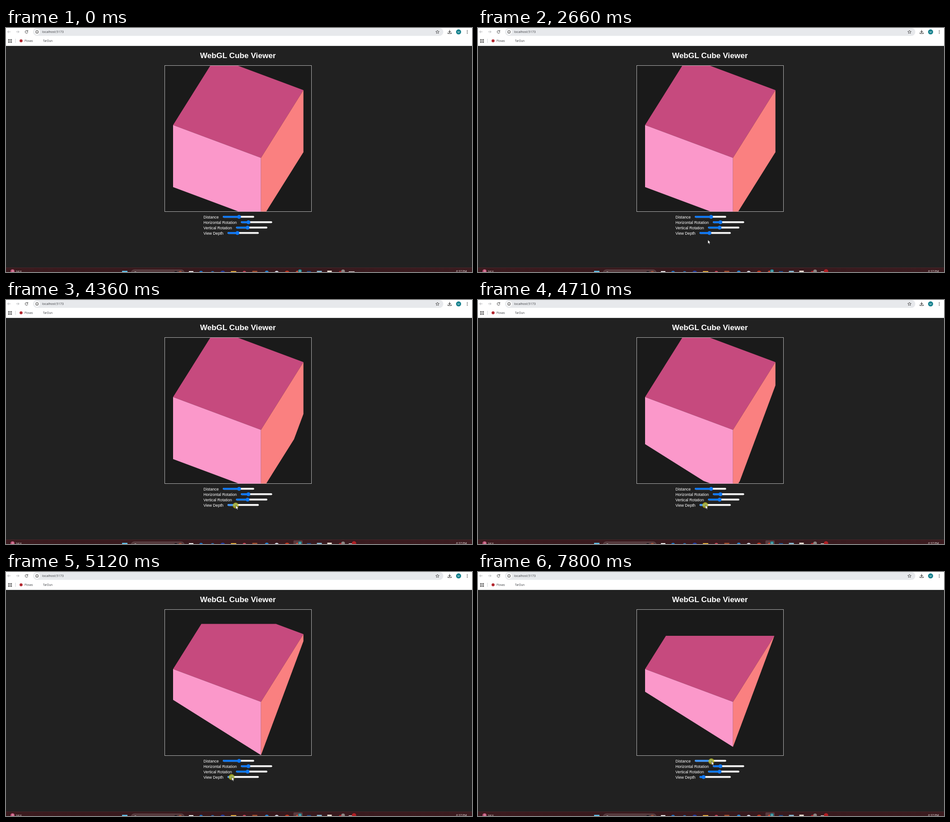
These frames come from a looping animation (1032 by 543 pixels, 8000 ms). An HTML page:

```html
<!DOCTYPE html>
<html lang="en">
<head>
<meta charset="utf-8">
<title>WebGL Cube Viewer</title>
<style>
  html, body { margin: 0; width: 100%; height: 100%; overflow: hidden; background: #212121; }
  svg { display: block; width: 1032px; height: 543px; }
  .page { font-family: "Liberation Sans", Arial, sans-serif; fill: #fff; }
  .ui { font-family: "Open Sans", "Noto Sans", sans-serif; }
  .line { fill: none; stroke: #333; stroke-width: 1; }
</style>
</head>
<body>
<svg viewBox="0 0 1032 543">
  <defs>
    <linearGradient id="bar">
      <stop offset="0" stop-color="#3b1a1e"/>
      <stop offset=".5" stop-color="#35181c"/>
      <stop offset="1" stop-color="#3b1b1f"/>
    </linearGradient>
    <clipPath id="view"><rect x="352" y="84" width="324.5" height="324.5"/></clipPath>
  </defs>
  <rect width="1032" height="543" fill="#212121"/>

  <!-- Browser bars -->
  <rect width="1032" height="40" fill="#fff"/>
  <rect y="39.3" width="1032" height=".7" fill="#d5d7da"/>
  <rect x="60" y="0" width="908.5" height="17.5" rx="8.7" fill="#e7e9ec"/>
  <g class="line">
    <path d="M10 8.5H3.5M6.5 5.5L3.5 8.5L6.5 11.5M22.5 8.5H29M26 5.5L29 8.5L26 11.5" stroke="#a9abae" stroke-width=".9"/>
    <path d="M47.6 6.6A3 3 0 1 0 48.4 9.2M48.3 5V7.3H46"/>
    <path d="M955.5 5L956.6 7.5L959.3 7.7L957.3 9.5L957.9 12.1L955.5 10.7L953.1 12.1L953.7 9.5L951.7 7.7L954.4 7.5Z" stroke-width=".8"/>
    <path d="M982.5 4.5V10M980 7.7L982.5 10.2L985 7.7M978.8 10.2V12.5H986.2V10.2" stroke-width="1.1"/>
    <path d="M5.3 25.3h2.4v2.4h-2.4zM10 25.3h2.4v2.4h-2.4zM5.3 30h2.4v2.4h-2.4zM10 30h2.4v2.4h-2.4z"/>
    <path d="M21 24V33" stroke="#cdd0d4"/>
  </g>
  <circle cx="68.7" cy="8.7" r="6.2" fill="#fff"/>
  <circle cx="68.7" cy="8.7" r="3.2" class="line" stroke-width=".8"/>
  <path d="M68.7 8.3V10.4M68.7 6.7V7.4" class="line"/>
  <circle cx="1002.3" cy="8.7" r="5.6" fill="#14808c"/>
  <g fill="#333"><circle cx="1021.5" cy="5.6" r=".9"/><circle cx="1021.5" cy="8.7" r=".9"/><circle cx="1021.5" cy="11.8" r=".9"/></g>
  <circle cx="33.4" cy="28.5" r="3.3" fill="#b3262e"/>
  <g class="ui" fill="#3a3c40">
    <text x="80" y="11.2" font-size="7.1">localhost:5173</text>
    <text x="41" y="30.9" font-size="6.2">Plovas</text>
    <text x="82" y="30.9" font-size="6.2">TarDun</text>
    <text x="1002.3" y="10.8" font-size="5.6" fill="#fff" text-anchor="middle">M</text>
  </g>

  <!-- Page -->
  <text class="page" x="429.7" y="67" font-size="17.25" font-weight="bold">WebGL Cube Viewer</text>
  <rect x="351.5" y="83.5" width="325" height="325" fill="#1a1a1a" stroke="#b4b4b4"/>
  <g id="cube" clip-path="url(#view)"></g>
  <g id="controls" class="page" font-size="8.7"></g>

  <!-- Taskbar -->
  <rect y="533" width="1032" height="10" fill="url(#bar)"/>
  <rect y="533" width="1032" height=".7" fill="#4b2b2f"/>
  <rect id="focus" x="636.5" y="535" width="20.5" height="12" rx="2" fill="#5a3b3f"/>
  <rect x="277" y="538" width="118" height="14" rx="7" fill="#54393c" stroke="#75595c" stroke-width=".7"/>
  <circle cx="286.5" cy="545" r="2.6" fill="none" stroke="#ddd"/>
  <g id="icons"></g>
  <g class="ui" font-size="6" fill="#f3eeee">
    <text x="22" y="544.2">58°F</text>
    <text x="997" y="544.2" font-size="6.3">6:37 PM</text>
    <text x="15.3" y="542.9" font-size="5" text-anchor="middle">6</text>
    <text x="651" y="543" font-size="4.5" text-anchor="middle">M</text>
  </g>
  <circle id="badge" cx="770.8" cy="541.5" fill="#b01f24"/>

  <circle id="press" fill="#c8be14" fill-opacity=".72"/>
  <path id="cursor" d="M0 0V8.4L1.9 6.8L3.1 9.7L4.6 9.1L3.4 6.3L5.8 6.1Z" fill="#fff" stroke="#111" stroke-width=".6"/>
</svg>
<script>
const LOOP = 8000;
const $ = id => document.getElementById(id);

function add(parent, tag, attrs) {
  const el = document.createElementNS("http://www.w3.org/2000/svg", tag);
  set(el, attrs);
  return parent.appendChild(el);
}
function set(el, attrs) {
  for (const key in attrs) el.setAttribute(key, attrs[key]);
}

// Taskbar icons: centre x, top y, width, colour, round
[
  [14.5, 537, 9, "#c2577c", 1], [263, 540.5, 12, "#63c9f3", 0],
  [376, 541, 7, "#17161c", 1], [386, 540.5, 7, "#a4533a", 1],
  [410, 541, 10, "#f2f2f2", 0], [432, 540.5, 9, "#1b78cf", 1],
  [457.5, 541, 8, "#2a6fb5", 1], [480, 540, 11, "#1f3ea8", 1],
  [504, 541, 12, "#e9b23c", 0], [528, 540.5, 8, "#d0475a", 1],
  [551, 540.5, 11, "#a9512f", 0], [577.5, 540, 9, "#2387d8", 1],
  [599.5, 540.5, 10, "#dfe4f2", 1], [622.5, 540, 11, "#c8371f", 1],
  [646, 540, 10, "#cf4a35", 1], [651, 537, 8, "#16808e", 1],
  [671, 541, 9, "#1c4c8c", 0], [694, 540.5, 11, "#8ec3de", 0],
  [716.5, 540, 10, "#e8ddd2", 0], [741, 540.5, 9, "#b8262c", 1],
  [746.5, 537.5, 8, "#8d8583", 1], [765.5, 541.7, 13, "#f0eeee", 0]
].forEach(([x, y, w, fill, round]) =>
  add($("icons"), "rect", { x: x - w / 2, y, width: w, height: w, rx: round ? w / 2 : .5, fill }));

// Sliders
const TRACK = 69.3;
const sliders = [
  ["Distance", 480.3, 516.2], ["Horizontal Rotation", 520.2, 536.8],
  ["Vertical Rotation", 509.5, 535], ["View Depth", 490.6, 512.5]
].map(([label, x, thumb], i) => {
  const y = 420.2 + i * 12, g = $("controls");
  add(g, "text", { x: 437.2, y: y + 4.2 }).textContent = label;
  const bar = { x, y: y - 2.1, height: 4.2, rx: 2.1 };
  return {
    x, y, thumb,
    rest: add(g, "rect", { ...bar, width: TRACK }),
    fill: add(g, "rect", bar),
    knob: add(g, "circle", { cy: y, r: 4.2 })
  };
});
const [distance, , , depth] = sliders;
const COLORS = {
  idle: ["#0f78f5", "#efefef"],
  hover: ["#0a5fc9", "#e3e3e3"],
  active: ["#3f95fb", "#f5f5f5"]
};

function drawSlider(s, pos, cx, cy, active) {
  const over = cx > s.x && cx < s.x + TRACK && Math.abs(cy - s.y) < 4.3;
  const [blue, grey] = COLORS[active ? "active" : over ? "hover" : "idle"];
  set(s.rest, { fill: grey });
  set(s.fill, { fill: blue, width: pos - s.x });
  set(s.knob, { fill: blue, cx: pos });
}

// Cube corners as x, y and distance; a far plane cuts away what lies behind it
const HEIGHT = 138, SLOPE = 1.465;
const top3 = (x, y) => [x, y, -y];
const below = ([x, y, z]) => [x, y + HEIGHT, z + HEIGHT * SLOPE];
const A = top3(370, 216), B = top3(564.7, 289), C = top3(658.7, 138.3), D = top3(464, 65.3);
const faces = [
  [[A, B, C, D], "#c64a7e"],
  [[A, B, below(B), below(A)], "#fb98ca"],
  [[B, C, below(C), below(B)], "#fa8080"]
].map(([points, fill]) => ({ points, el: add($("cube"), "polygon", { fill }) }));

function clip(points, far) {
  const out = [];
  points.forEach((p, i) => {
    const q = points[(i + 1) % points.length];
    if (p[2] <= far) out.push(p);
    if ((p[2] <= far) !== (q[2] <= far)) {
      const k = (far - p[2]) / (q[2] - p[2]);
      out.push(p.map((v, j) => v + (q[j] - v) * k));
    }
  });
  return out;
}

// Stepped progress: the first step lands at t0, the last at t1
function stepped(t, t0, t1, n) {
  if (t < t0) return 0;
  if (t >= t1) return 1;
  return (Math.floor((t - t0) / (t1 - t0) * (n - 1) + 1e-6) + 1) / n;
}

// start, end, steps, then cursor x, cursor y, cut height
const START = [705, 551, -108];
const MOVES = [
  [1090, 1290, 4, 652, 521, -108],
  [1490, 2120, 10, 514, 481, -108],
  [2520, 2660, 3, 509, 471.5, -108],
  [2730, 3220, 8, 513, 456.5, -108],
  [3950, 4090, 3, 509, 457, -30.5],
  [4430, 4710, 5, 503.7, 456.3, 62.5],
  [4780, 5120, 5, 500, 456, 115.5],
  [5190, 5190, 1, 500, 456, 142],
  [6605, 7200, 8, 517.2, 421, 142]
];

function pose(t) {
  let state = START;
  for (const [t0, t1, n, ...end] of MOVES) {
    if (t < t0) break;
    const k = stepped(t, t0, t1, n);
    state = state.map((v, i) => v + (end[i] - v) * k);
  }
  return state;
}

function draw(t) {
  const [x, y, cut] = pose(t);
  const dragging = t >= 3490 && t < 6520, pressing = t >= 7730;

  for (const { points, el } of faces)
    set(el, { points: clip(points, -cut).map(p => p[0].toFixed(2) + "," + p[1].toFixed(2)).join(" ") });

  const depthPos = 499.5 + (142 - cut) / 19.2;
  for (const s of sliders)
    drawSlider(s, s === depth ? depthPos : s.thumb, x, y,
      s === depth ? dragging : s === distance && pressing);

  const fresh = (t >= 3490 && t < 3560) || (t >= 7730 && t < 7800);
  set($("press"), { cx: x - .4, cy: y + .3, r: dragging || pressing ? (fresh ? 5.2 : 6.5) : 0 });
  set($("cursor"), { transform: `translate(${x} ${y})`, visibility: t < 1090 ? "hidden" : "visible" });
  set($("badge"), { r: 4.8 * stepped(t, 120, 330, 4) });
  set($("focus"), { visibility: t < 3490 ? "hidden" : "visible" });
}

const begin = performance.now();
function tick() {
  draw((performance.now() - begin) % LOOP);
  requestAnimationFrame(tick);
}
tick();
</script>
</body>
</html>
```
